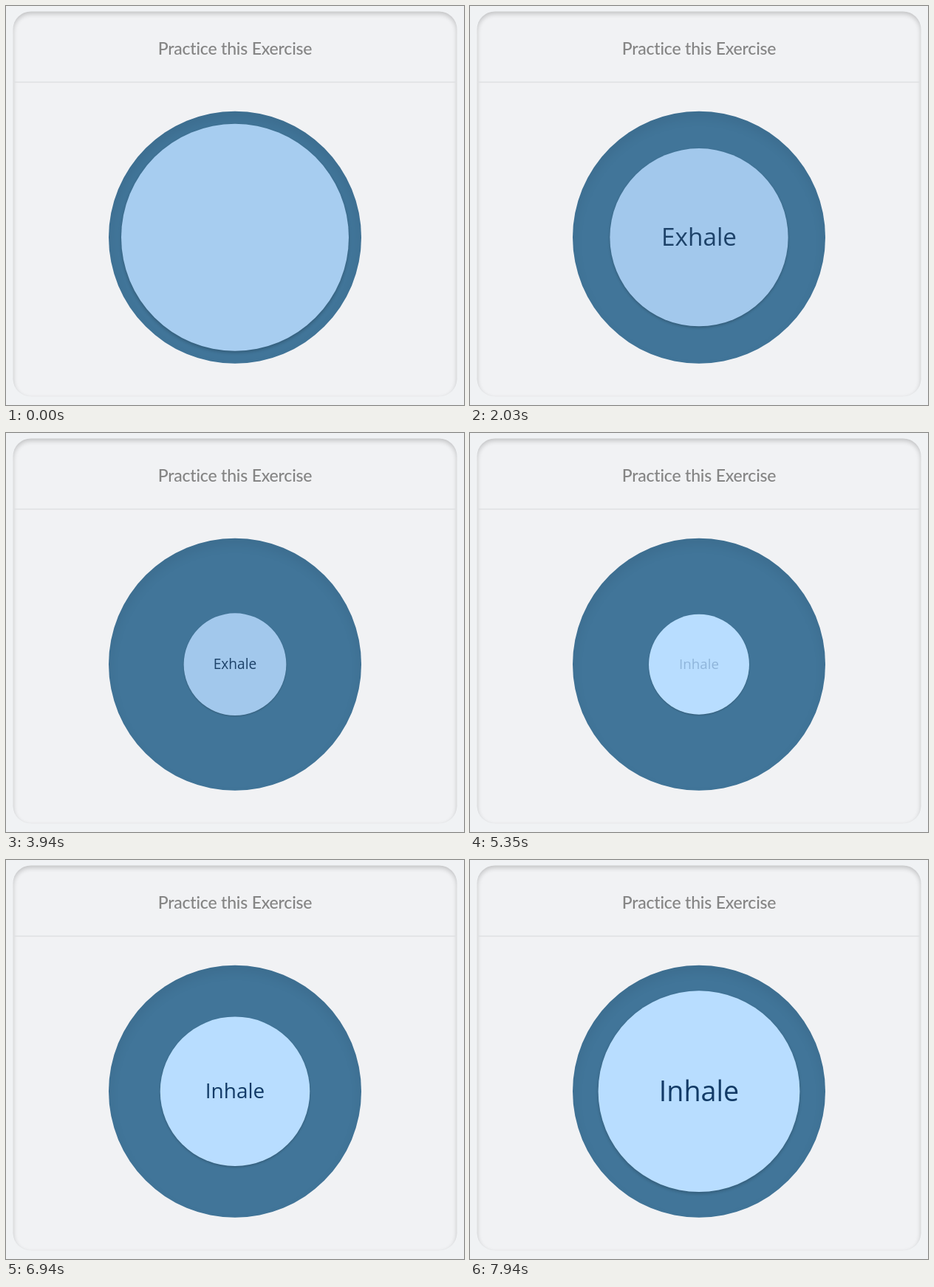
Write an HTML page with a canvas that moves like this. It is 620x541 px and loops after 8000 ms.

```html
<!DOCTYPE html>
<html lang="en">
<head>
<meta charset="utf-8">
<title>Breathing exercise</title>
<style>
html, body { margin: 0; width: 100%; height: 100%; overflow: hidden; background: #f0f2f4; }
canvas { display: block; width: 620px; height: 541px; }
</style>
</head>
<body>
<canvas id="stage" width="620" height="541"></canvas>
<script>
const ctx = document.getElementById('stage').getContext('2d');
const LOOP = 8000;
const CX = 310, CY = 313.7;
const R_MAX = 154, R_MIN = 67.8;
const EXHALE = { word: 'Exhale', start: 270, length: 4060, fill: [162, 200, 236], ink: '#1d4269', weight: 400 };
const INHALE = { word: 'Inhale', start: 5220, length: 3960, fill: [184, 221, 255], ink: '#123a66', weight: 500 };

const clamp = x => Math.min(1, Math.max(0, x));
const ramp = (t, from, to) => clamp((t - from) / (to - from));
const mix = (a, b, k) => a + (b - a) * k;

// Same curve as CSS ease-in-out, solved by bisection.
function ease(x) {
  let lo = 0, hi = 1;
  for (let i = 0; i < 24; i++) {
    const s = (lo + hi) / 2, u = 1 - s;
    if (1.26 * s * u * u + 1.74 * s * s * u + s * s * s < x) lo = s; else hi = s;
  }
  return lo * lo * (3 - 2 * lo);
}

const progress = (phase, t) => ease(clamp((t - phase.start) / phase.length));

function disc(r, fill) {
  ctx.beginPath();
  ctx.arc(CX, CY, r, 0, Math.PI * 2);
  ctx.fillStyle = fill;
  ctx.fill();
}

function shadow(color, blur, dx, dy) {
  ctx.shadowColor = color;
  ctx.shadowBlur = blur;
  ctx.shadowOffsetX = dx;
  ctx.shadowOffsetY = dy;
}

// Only the shadow of the surrounding area shows; the area itself is off stage.
function insetShadow(shape, color, blur, dy) {
  const away = 1000;
  const outside = new Path2D();
  outside.rect(-100, -100, 820, 741);
  outside.addPath(shape);
  ctx.save();
  ctx.clip(shape);
  shadow(color, blur, away, dy);
  ctx.translate(-away, 0);
  ctx.fillStyle = '#000';
  ctx.fill(outside, 'evenodd');
  ctx.restore();
}

const card = new Path2D();
card.roundRect(9.5, 7.5, 601, 522, 24);
const ring = new Path2D();
ring.arc(CX, CY, 171, 0, Math.PI * 2);

function drawCard() {
  ctx.fillStyle = '#f0f2f4';
  ctx.fillRect(0, 0, 620, 541);
  ctx.fillStyle = '#f1f2f4';
  ctx.fill(card);
  insetShadow(card, 'rgba(0,0,0,.2)', 6, 3);
  ctx.fillStyle = '#e0e1e3';
  ctx.fillRect(10, 102.5, 600, 1.6);
  ctx.font = '500 23px Lato, "Open Sans", sans-serif';
  ctx.letterSpacing = '-0.2px';
  ctx.textAlign = 'center';
  ctx.fillStyle = '#858585';
  ctx.fillText('Practice this Exercise', CX, 66);
}

function drawRing() {
  ctx.fillStyle = '#417599';
  ctx.fill(ring);
  insetShadow(ring, 'rgba(0,0,0,.07)', 16, 8);
}

function drawWord(phase, r, alpha) {
  if (alpha <= 0) return;
  ctx.save();
  ctx.globalAlpha = alpha;
  ctx.translate(CX, CY);
  ctx.scale(r / 100, r / 100);
  ctx.font = `${phase.weight} 27.6px "Open Sans", Lato, sans-serif`;
  ctx.letterSpacing = '0px';
  ctx.textAlign = 'center';
  ctx.fillStyle = phase.ink;
  ctx.fillText(phase.word, 0, 9.6);
  ctx.restore();
}

function draw(t) {
  const r = R_MAX + (R_MIN - R_MAX) * (progress(EXHALE, t) - progress(INHALE, t));
  const tint = t < 2000 ? 1 - ramp(t, -600, 180) : ramp(t, 4340, 5060);
  const fill = EXHALE.fill.map((c, i) => Math.round(mix(c, INHALE.fill[i], tint)));

  drawCard();
  drawRing();
  ctx.save();
  shadow('rgba(0,0,0,.22)', r * 0.03, 0, r * 0.015);
  disc(r, `rgb(${fill})`);
  ctx.restore();
  drawWord(EXHALE, r, ramp(t, 290, 750) * (1 - ramp(t, 4340, 4800)));
  drawWord(INHALE, r, ramp(t, 5240, 5700));
}

function tick(now) {
  draw(now % LOOP);
  requestAnimationFrame(tick);
}
draw(0);
requestAnimationFrame(tick);
</script>
</body>
</html>
```
